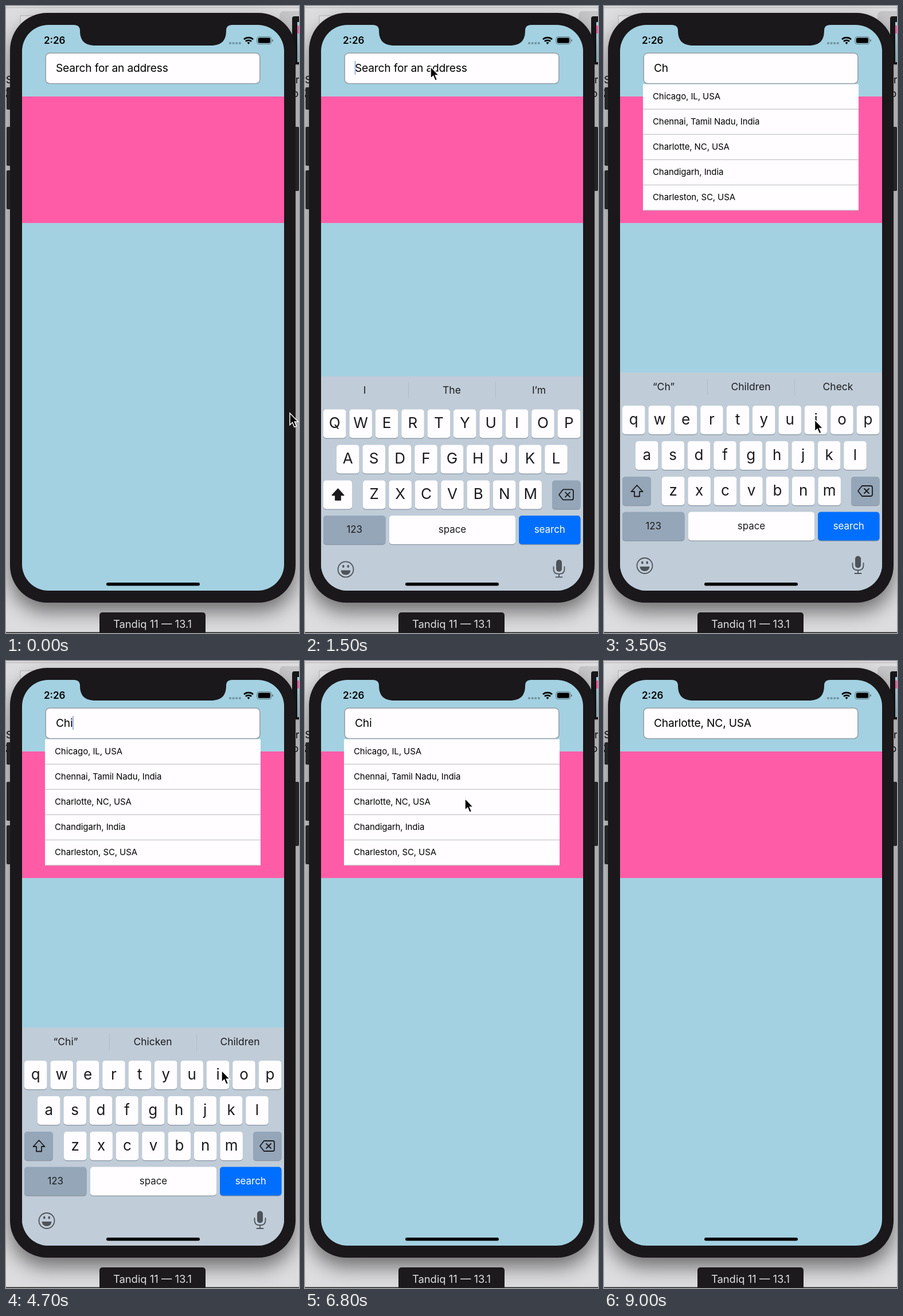
An HTML page that plays this animation: 511 by 1095 pixels, repeating every 9100 ms.

```html
<!DOCTYPE html>
<html lang="en">
<head>
<meta charset="utf-8">
<title>Address search</title>
<style>
  html, body { margin: 0; width: 100%; height: 100%; overflow: hidden; background: #d9d8da; }
  svg { display: block; width: 100%; height: 100%; font-family: Inter, sans-serif; }
  .field { font-size: 19.2px; letter-spacing: -.2px; }
  .row { font-size: 15px; letter-spacing: -.1px; }
  .mid { text-anchor: middle; }
  .hint { font-size: 17.5px; }
  .key { font-size: 26px; }
  .cmd { font-size: 16.9px; }
  .line { fill: none; stroke: #1b1b1d; stroke-width: 1.8; stroke-linejoin: round; stroke-linecap: round; }
</style>
</head>
<body>
<svg viewBox="0 0 511 1095">
  <defs>
    <clipPath id="screen"><rect x="28" y="33" width="457" height="988" rx="46"/></clipPath>
    <filter id="blur" x="-20%" y="-20%" width="140%" height="140%"><feGaussianBlur stdDeviation="17"/></filter>
    <linearGradient id="fade">
      <stop offset=".55" stop-color="#1b1b1d"/>
      <stop offset=".75" stop-color="#1b1b1d" stop-opacity=".5"/>
      <stop offset="1" stop-color="#1b1b1d" stop-opacity=".3"/>
    </linearGradient>
  </defs>

  <!-- desktop -->
  <rect width="511" height="1095" fill="#dddcde"/>
  <rect y="2" width="511" height="1.5" fill="#bebdbf"/>
  <rect x="25" y="17" width="40" height="40" fill="#e6e5e7" stroke="#b5b4b6"/>
  <rect x="477" y="9" width="50" height="95" rx="7" fill="#c6c5c7"/>
  <rect x="499" y="18" width="20" height="84" rx="4" fill="#18171a"/>
  <rect x="508" y="28" width="6" height="70" fill="#a3d1e1"/>
  <rect x="508" y="34" width="6" height="14" fill="#ff5ca8"/>
  <g font-size="17"><text x="0" y="135">S</text><text x="-3" y="159">2</text><text x="505" y="135">r</text><text x="500" y="159">or</text></g>
  <rect x="7" y="30" width="498" height="1028" rx="64" opacity=".5" filter="url(#blur)"/>
  <rect y="1093.5" width="511" height="1.5" fill="#222"/>

  <!-- phone -->
  <g fill="#242326">
    <rect x="1" y="142" width="10" height="39" rx="2"/>
    <rect x="1" y="211" width="10" height="68" rx="2"/>
    <rect x="1" y="287" width="10" height="68" rx="2"/>
    <rect x="502" y="211" width="9" height="112" rx="2"/>
  </g>
  <rect x="7" y="12" width="498" height="1030" rx="65" fill="#1a181b"/>
  <g clip-path="url(#screen)">
    <rect x="28" y="33" width="457" height="988" fill="#a3d1e1"/>
    <rect x="28" y="158" width="457" height="221" fill="#ff5ca8"/>
    <rect x="69.2" y="82.2" width="373.6" height="53.2" rx="7" fill="#fffdff" stroke="#979da2" stroke-width="1.5"/>
    <text id="value" class="field" x="87" y="115"></text>
    <rect id="caret" y="96" width="2" height="24" fill="#3b6fcb"/>
    <g id="list"><rect x="68" y="136.5" width="376" height="220.5" fill="#fffdff"/></g>
    <g id="keyboard"><rect x="28" y="640" width="457" height="390" fill="#c0ccd8"/></g>
    <rect x="175" y="1007" width="163" height="5.5" rx="2.7"/>
  </g>
  <path d="M118 32H394V33Q384 33 384 43C384 60 376 69 357 69H156C137 69 129 60 129 43Q129 33 118 33Z" fill="#1a181b"/>

  <!-- status bar -->
  <text x="66" y="66" font-size="17" font-weight="600">2:26</text>
  <path d="M391 65H408" stroke="#6f929f" stroke-width="4.2" stroke-linecap="round" stroke-dasharray="0 5.6"/>
  <g fill="none" stroke="#000" stroke-width="2.7">
    <path d="M415 58.2A11.8 11.8 0 0 1 431 58.2M417.9 61.8A7.5 7.5 0 0 1 428.1 61.8"/>
    <path d="M420.6 64.1L423 67 425.4 64.1A3.6 3.6 0 0 0 420.6 64.1Z" fill="#000" stroke="none"/>
  </g>
  <rect x="437.8" y="53.8" width="25" height="12.8" rx="3.8" fill="none" stroke="#55707a"/>
  <rect x="439.7" y="55.6" width="21.3" height="9.2" rx="2.2"/>
  <path d="M464.2 58V62.5Q466 61.8 466 60.2T464.2 58" fill="#55707a"/>

  <rect x="163" y="1059" width="185" height="42" rx="5" fill="#1c1a1d"/>
  <text class="mid" x="255.5" y="1085.5" font-size="18.4" fill="#dedddf">Tandiq 11 — 13.1</text>
  <path id="mouse" d="M0 0V20.5L4.6 16.3 8 24.3 11.6 22.8 8.3 15H14.5Z" stroke="#fff" stroke-width="1.5"/>
</svg>

<script>
const $ = id => document.getElementById(id);
const LOOP = 9100, FOCUS = 1100, BLUR = 6200, PICK = 7700;
const INK = '#1b1b1d', DARK = '#94a6b8', WHITE = '#fffdff';

function add(parent, tag, attrs, text = '') {
  const el = document.createElementNS('http://www.w3.org/2000/svg', tag);
  for (const k in attrs) el.setAttribute(k, attrs[k]);
  el.textContent = text;
  return parent.appendChild(el);
}

// suggestion list
const cities = ['Chicago, IL, USA', 'Chennai, Tamil Nadu, India', 'Charlotte, NC, USA', 'Chandigarh, India', 'Charleston, SC, USA'];
cities.forEach((city, i) => {
  const y = 136 + i * 44.1;
  add($('list'), 'text', { class: 'row', x: 85, y: y + 27 }, city);
  add($('list'), 'rect', { x: 68, y: y + 43.5, width: 376, height: 1.4, fill: '#c9c8cc' });
});

// keyboard
const kb = $('keyboard');
function key(x, y, width, label, cls, fill = WHITE, ink = INK) {
  add(kb, 'rect', { x, y: y + 1.3, width, height: 50, rx: 5, fill: '#8995a1' });
  const face = add(kb, 'rect', { x, y, width, height: 50, rx: 5, fill });
  const text = add(kb, 'text', { class: 'mid ' + cls, x: x + width / 2, y: y + (cls === 'key' ? 33 : 30.5), fill: ink }, label);
  return { face, text };
}
const hints = [104, 256, 408].map(x => add(kb, 'text', { class: 'mid hint', x, y: 671 }));
for (const x of [180, 332]) add(kb, 'rect', { x, y: 651, width: 1, height: 29, fill: '#b1bdc9' });
const letters = [];
[['qwertyuiop', 32], ['asdfghjkl', 55], ['zxcvbnm', 101]].forEach(([row, x], r) =>
  [...row].forEach((c, i) => letters.push(key(x + i * 45.4, 698 + r * 62, 39.5, c, 'key').text)));
const shift = key(32, 822, 50, '', 'cmd', DARK).face;
key(431, 822, 49.5, '', 'cmd', DARK);
key(32, 883.5, 108.5, '123', 'cmd', DARK);
key(147, 883.5, 220, 'space', 'cmd');
key(373, 883.5, 107.5, 'search', 'cmd', '#006fff', '#fff');
const arrow = add(kb, 'path', { class: 'line', d: 'M57.5 837L47.5 848H53V856.5H62V848H67.5Z' });
add(kb, 'path', { class: 'line', d: 'M450 838H465Q468 838 468 841V853Q468 856 465 856H450L443 847ZM454 843L462 851M462 843L454 851' });
add(kb, 'circle', { class: 'line', cx: 71, cy: 977.5, r: 13.5, style: 'stroke:#4d5359' });
add(kb, 'path', { d: 'M62.5 979H79.5Q78.5 987 71 987T62.5 979M65 972a1.8 2.5 0 1 0 3.6 0a1.8 2.5 0 1 0-3.6 0M73.4 972a1.8 2.5 0 1 0 3.6 0a1.8 2.5 0 1 0-3.6 0', fill: '#4d5359' });
add(kb, 'rect', { x: 438, y: 960.5, width: 10, height: 21, rx: 5, fill: '#4d5359' });
add(kb, 'path', { class: 'line', d: 'M433.5 973V977Q433.5 985.5 443 985.5T452.5 977V973M443 985.5V991M437.5 991H448.5', style: 'stroke:#4d5359' });

// [time, field text, keyboard suggestions]
const states = [
  [0, 'Search for an address', ['“Chi”', 'Chicken', 'Children']],
  [1300, 'Search for an address', ['I', 'The', 'I’m']],
  [2300, 'C', ['“C”', '', '']],
  [3000, 'Ch', ['“Ch”', 'Children', 'Check']],
  [3800, 'Chi', ['“Chi”', 'Chicken', 'Children']],
  [PICK, cities[2], ['', '', '']]
];
// [time, x, y]
const route = [
  [0, 495, 711], [200, 495, 711], [900, 219, 106], [1500, 219, 106], [2100, 206, 842], [2400, 206, 842],
  [2600, 278, 797], [2800, 294, 787], [3100, 294, 787], [3600, 376, 715], [5000, 376, 715],
  [5900, 279, 240], [7900, 279, 240], [8600, 530, 420], [LOOP, 530, 420]
];

const clamp = v => Math.max(0, Math.min(1, v));
const smooth = p => p * p * (3 - 2 * p);
function spring(ms) {
  if (ms <= 0) return 0;
  const s = ms * .018;
  return ms > 480 ? 1 : 1 - (1 + s) * Math.exp(-s);
}

function draw(t) {
  const [since, value, words] = states.findLast(s => t >= s[0]);
  const typed = t >= 2300;
  $('value').textContent = value;

  const focused = t >= FOCUS && t < BLUR;
  const phase = (t - Math.max(FOCUS, typed ? since : 0)) / 1000;
  $('caret').setAttribute('x', 86.5 + (typed ? $('value').getComputedTextLength() : 0));
  $('caret').setAttribute('opacity', focused ? clamp(.5 + 1.2 * Math.cos(2 * Math.PI * (phase - .15))) : 0);
  $('list').setAttribute('visibility', t >= 3500 && t < PICK ? 'visible' : 'hidden');

  const shown = spring(t - FOCUS - 65) - spring(t - BLUR - 65);
  kb.setAttribute('transform', `translate(0 ${381 * (1 - shown)})`);
  kb.setAttribute('visibility', shown > 0 ? 'visible' : 'hidden');
  hints.forEach((h, i) => {
    h.textContent = words[i];
    h.setAttribute('fill', t < 1300 ? 'url(#fade)' : INK);
  });
  for (const l of letters) l.textContent = typed ? l.textContent.toLowerCase() : l.textContent.toUpperCase();
  shift.setAttribute('fill', typed ? DARK : WHITE);
  arrow.style.fill = typed ? 'none' : INK;

  const n = route.findIndex(p => t < p[0]);
  const [t0, x0, y0] = route[n - 1], [t1, x1, y1] = route[n];
  const p = smooth((t - t0) / (t1 - t0));
  $('mouse').setAttribute('transform', `translate(${x0 + (x1 - x0) * p} ${y0 + (y1 - y0) * p})`);
}

function tick() {
  draw(Math.floor(performance.now() % LOOP / 100) * 100);
  requestAnimationFrame(tick);
}
tick();
</script>
</body>
</html>
```
